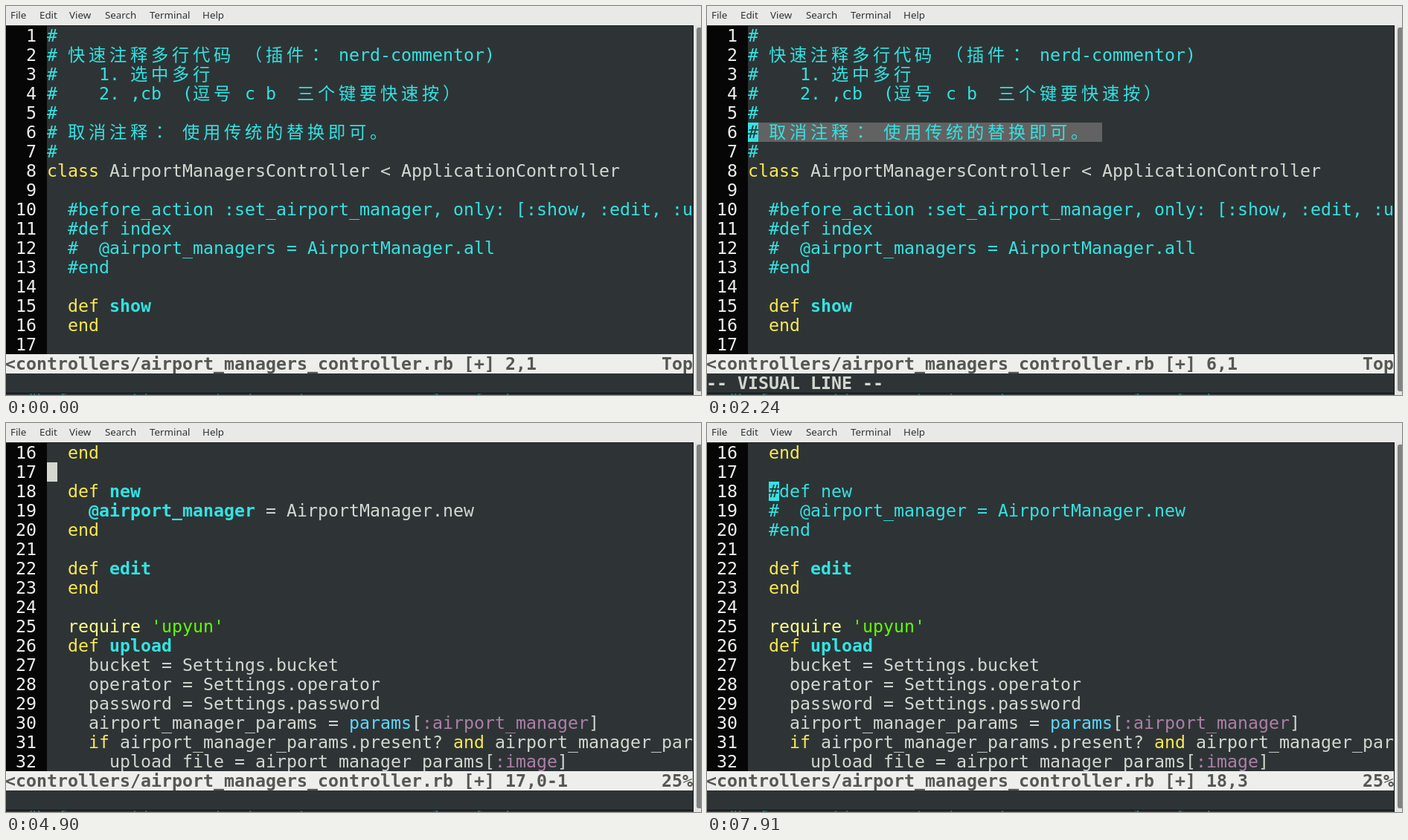
Write an HTML page with a canvas that moves like this. It is 934 px wide and 524 px high and loops after 8 s.

```html
<!DOCTYPE html>
<html lang="zh">
<head>
<meta charset="utf-8">
<style>
html, body { margin: 0; width: 100%; height: 100%; overflow: hidden; background: #2e3436; }
canvas { display: block; width: 934px; height: 524px; }
</style>
</head>
<body>
<canvas id="stage" width="934" height="524"></canvas>
<script>
const ctx = document.getElementById('stage').getContext('2d', { alpha: false });
const LOOP = 8000, CELL = 14, ROW = 26, LEFT = -1, TOP = 27, BASE = 21, TEXT_COL = 4, ROWS = 17;
const PAGE_AT = 4690, COMMENT_AT = 6790;
const BG = '#2e3436', GREY = '#d3d7cf';
const MONO = '23.25px "DejaVu Sans Mono", "Noto Sans CJK SC", monospace';
const CENTRED = '23.25px "Noto Sans CJK JP", sans-serif';

// A tilde and a letter switch the text style.
const STYLES = {
  t: { color: GREY }, c: { color: '#34e2e2' }, b: { color: '#34e2e2', bold: true },
  y: { color: '#fce94f' }, p: { color: '#ffff87' }, g: { color: '#5fff00' },
  m: { color: '#ad7fa8' }, s: { color: '#5fd7ff' },
  n: { color: '#eeeeec' }, z: { color: '#555753', bold: true }, w: { color: GREY, bold: true }
};

const SOURCE = [
  '~c#',
  '~c# 快速注释多行代码 （插件： nerd-commentor)',
  '~c#    1. 选中多行',
  '~c#    2. ,cb  (逗号 c b  三个键要快速按）',
  '~c#',
  '~c# 取消注释： 使用传统的替换即可。',
  '~c#',
  '~yclass~t AirportManagersController < ApplicationController',
  '',
  '  ~c#before_action :set_airport_manager, only: [:show, :edit, :u',
  '  ~c#def index',
  '  ~c#  @airport_managers = AirportManager.all',
  '  ~c#end',
  '',
  '  ~ydef ~bshow',
  '  ~yend',
  '',
  '  ~ydef ~bnew',
  '    ~b@airport_manager~t = AirportManager.new',
  '  ~yend',
  '',
  '  ~ydef ~bedit',
  '  ~yend',
  '',
  "  ~prequire ~g'upyun'",
  '  ~ydef ~bupload',
  '    bucket = Settings.bucket',
  '    operator = Settings.operator',
  '    password = Settings.password',
  '    airport_manager_params = ~sparams~t[~m:airport_manager~t]',
  '    ~yif~t airport_manager_params.present? ~yand~t airport_manager_par',
  '      upload_file = airport_manager_params[~m:image~t]'
];

// Time, then the cursor's line.
const MOVES = [
  [0, 2], [840, 3], [980, 4], [1540, 5], [1750, 6], [3010, 7], [3150, 8], [3360, 9],
  [3570, 10], [PAGE_AT, 16], [4900, 17], [5110, 18], [6020, 19], [6160, 20], [7770, 19], [7910, 18]
];
// Start, end, first selected line.
const SELECTIONS = [[560, 1540, 2], [2240, 3010, 6], [5740, COMMENT_AT, 18]];
const BLINKS = [[0, 210], [4340, 4550]];

const cellX = col => LEFT + col * CELL;
const within = t => ([start, end]) => t >= start && t < end;

function fill(color, x, y, w, h) {
  ctx.fillStyle = color;
  ctx.fillRect(x, y, w, h);
}

function parse(markup, style = 't') {
  const cells = [];
  const chars = [...markup];
  let col = 0;
  for (let i = 0; i < chars.length; i++) {
    if (chars[i] === '~') { style = chars[++i]; continue; }
    cells.push({ ch: chars[i], col, style: STYLES[style] });
    col += chars[i] > '\u2e80' ? 2 : 1;
  }
  cells.width = col;
  return cells;
}

function drawCell({ ch, col, style }, y, firstCol, color = style.color) {
  if (ch === ' ') return;
  ctx.font = ch === '：' ? CENTRED : (style.bold ? 'bold ' : '') + MONO;
  ctx.fillStyle = color;
  ctx.fillText(ch, cellX(firstCol + col), y + BASE);
}

function write(text, col, y, style) {
  parse(text, style).forEach(cell => drawCell(cell, y, col));
}

const plainLines = SOURCE.map(line => parse(line));
const commentedLines = plainLines.slice();
['  ~c#def new', '  ~c#  @airport_manager = AirportManager.new', '  ~c#end']
  .forEach((line, i) => { commentedLines[17 + i] = parse(line); });

function drawChrome() {
  fill('#e9e9e7', 0, 0, 934, 26);
  fill('#1b1e1f', 0, 26, 924, 1);
  fill('#e4e4e2', 924, 26, 10, 498);
  fill('#101212', 923, 26, 1, 498);
  ctx.fillStyle = '#7f8281';
  ctx.beginPath();
  ctx.roundRect(928, 29, 8, 490, 3);
  ctx.fill();
  ctx.font = '13.33px "Noto Sans", "Open Sans", sans-serif';
  ctx.fillStyle = '#2e3436';
  [['File', 6], ['Edit', 45], ['View', 85], ['Search', 133], ['Terminal', 193], ['Help', 264]]
    .forEach(([label, x]) => ctx.fillText(label, x, 17));
}

// A sliver of dim text shows under the terminal's lower edge.
function drawLowerEdge() {
  fill('#0b0d0d', 0, 521, 923, 1);
  ctx.save();
  ctx.beginPath();
  ctx.rect(0, 522, 923, 2);
  ctx.clip();
  ctx.globalAlpha = 0.45;
  write('  #before_action :set_airport_manager, only: [:show, ', 0, 518, 'c');
  ctx.restore();
}

function drawStatus(line, col, paged, selecting) {
  const y = TOP + ROWS * ROW;
  fill('#eeeeec', 0, y, 923, ROW);
  write(`<controllers/airport_managers_controller.rb [+] ${line},${col}`, 0, y, 'z');
  write(paged ? '25%' : 'Top', 63, y, 'z');
  if (selecting) write('-- VISUAL LINE --', 0, y + ROW, 'w');
}

function draw(t) {
  const paged = t >= PAGE_AT;
  const first = paged ? 16 : 1;
  const lines = t >= COMMENT_AT ? commentedLines : plainLines;
  const line = MOVES.filter(([at]) => at <= t).pop()[1];
  const selection = SELECTIONS.find(within(t));
  const current = lines[line - 1];
  const cursorCol = paged && current.width ? 2 : 0;
  const rowY = n => TOP + (n - first) * ROW;

  fill(BG, 0, 0, 934, 524);
  fill('#060606', 0, TOP, cellX(TEXT_COL), ROWS * ROW);
  if (selection) {
    for (let n = selection[2]; n <= line; n++) {
      fill('#626262', cellX(TEXT_COL), rowY(n), (lines[n - 1].width + 1) * CELL, ROW);
    }
  }
  for (let n = first; n < first + ROWS; n++) {
    write(String(n).padStart(2), 1, rowY(n), 'n');
    lines[n - 1].forEach(cell => drawCell(cell, rowY(n), TEXT_COL));
  }
  if (!BLINKS.some(within(t))) {
    const cell = current.find(c => c.col === cursorCol);
    const color = cell && cell.ch !== ' ' ? cell.style.color : GREY;
    fill(color, cellX(TEXT_COL + cursorCol), rowY(line), CELL, ROW);
    if (cell) drawCell(cell, rowY(line), TEXT_COL, BG);
  }
  drawStatus(line, current.width ? cursorCol + 1 : '0-1', paged, selection);
  drawLowerEdge();
  drawChrome();
}

const began = performance.now();
function tick() {
  draw((performance.now() - began) % LOOP);
  requestAnimationFrame(tick);
}
tick();
</script>
</body>
</html>
```
